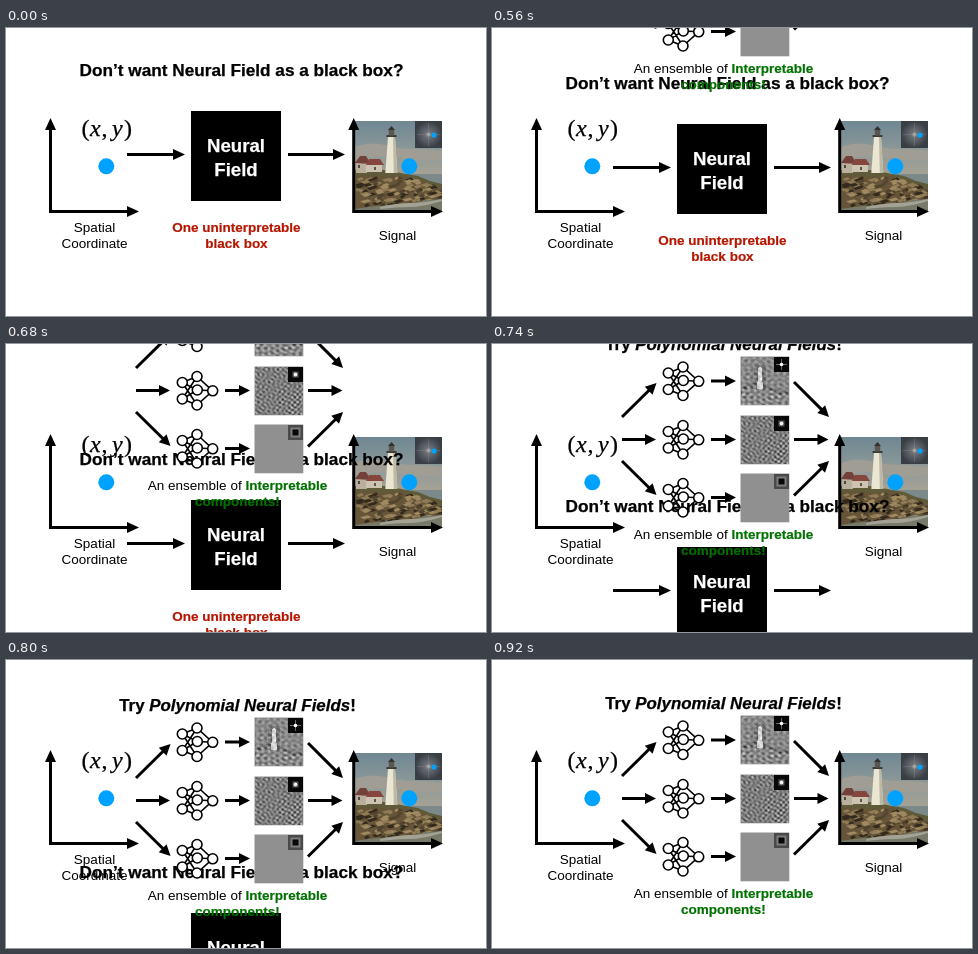
An HTML page that plays this animation: 480 px wide and 288 px high, repeating every 8 s.

```html
<!DOCTYPE html>
<html lang="en">
<head>
<meta charset="utf-8">
<title>Neural fields</title>
<style>
  html, body { margin: 0; width: 100%; height: 100%; overflow: hidden; background: #fff; }
  svg { display: block; width: 100%; height: 100%; }
  text { font-family: "Liberation Sans", Arial, sans-serif; font-size: 13.5px; text-anchor: middle; white-space: pre; }
  .b { font-weight: 700; }
  .title { font-weight: 700; font-size: 17.2px; stroke: #000; stroke-width: .25; }
  .sub { font-size: 16.9px; }
  .box { font-weight: 700; font-size: 18.6px; fill: #fff; stroke: #fff; stroke-width: .25; }
  .math { font-family: "Liberation Serif", "Times New Roman", serif; font-size: 24px; text-anchor: start; stroke: #000; stroke-width: .25; }
  .math .i { font-style: italic; }
  .red { fill: #b51700; stroke: #b51700; stroke-width: .2; }
  .green { fill: #017100; font-weight: 700; stroke: #017100; stroke-width: .2; }
</style>
</head>
<body>
<svg id="stage" viewBox="0 0 480 288">
  <defs>
    <linearGradient id="sky" x1="0" y1="0" x2="0" y2="1">
      <stop offset="0" stop-color="#6f8793"/>
      <stop offset=".35" stop-color="#8e9a99"/>
      <stop offset=".62" stop-color="#a8a294"/>
    </linearGradient>
    <radialGradient id="glow">
      <stop offset="0" stop-color="#c9bfb0"/>
      <stop offset=".2" stop-color="#6d7178"/>
      <stop offset="1" stop-color="#393d44"/>
    </radialGradient>
    <clipPath id="frame"><rect x="349" y="93" width="87" height="90"/></clipPath>
  </defs>
  <rect width="480" height="288" fill="#fff"/>
  <g id="fixed"></g>
  <g id="before"></g>
  <g id="after"></g>
</svg>
<script>
const LOOP = 8000, START = 500, STEP = 30, STEPS = 14;
const BLUE = '#00a2ff';
const $ = id => document.getElementById(id);

const text = (x, y, body, cls = '') => `<text x="${x}" y="${y}" class="${cls}">${body}</text>`;
const rect = (x, y, w, h, fill) => `<rect x="${x}" y="${y}" width="${w}" height="${h}" fill="${fill}"/>`;
const disc = (x, y, r, fill) => `<circle cx="${x}" cy="${y}" r="${r}" fill="${fill}"/>`;
const shape = (d, fill) => `<path d="${d}" fill="${fill}"/>`;

function random(seed) {
  return () => (seed = (seed * 16807) % 2147483647) / 2147483647;
}

function arrow(x1, y1, x2, y2, head = 11) {
  const len = Math.hypot(x2 - x1, y2 - y1);
  const angle = Math.atan2(y2 - y1, x2 - x1) * 180 / Math.PI;
  return `<g transform="translate(${x1} ${y1}) rotate(${angle})">` +
    `<path d="M0 0H${len - head + 1}" stroke="#000" stroke-width="3"/>` +
    `<path d="M${len} 0l${-head} -5.5v11z"/></g>`;
}

const axes = (x, tip) =>
  arrow(x, 185, x, 90, 12) + arrow(x, 183.5, tip, 183.5, 12);

// Short slanted facets scattered over the rocks.
function facets() {
  const rnd = random(17), tones = ['#33291c', '#8f7b55', '#51442f', '#a08a62'];
  let out = '';
  for (let i = 0; i < 130; i++) {
    const x = 349 + 82 * rnd(), top = 150 + Math.max(0, x - 395) * .28;
    const y = top + (178 - top) * rnd(), w = 3 + 5 * rnd();
    out += shape(`M${x} ${y}l${w} -2l${w / 2} 2l${-w} 2z`, tones[i % 4]);
  }
  return out;
}

function photo() {
  return '<g clip-path="url(#frame)">' +
    rect(349, 93, 87, 90, 'url(#sky)') +
    shape('M349 119q16 -6 30 -2t30 4t27 2v8q-22 3 -42 -1t-45 1z', '#a09e94') +
    rect(349, 146, 87, 37, '#7c898b') +
    shape('M349 142l14 -2l22 3l15 3l12 2l12 5l12 3v5l-22 5l-28 2l-37 1z', '#5f5a38') +
    rect(350, 134, 11, 11, '#b9af9c') + rect(360, 136, 16, 8, '#cdc3b0') +
    shape('M349 135l5 -7h6l5 8z', '#74403a') + shape('M360 137l3 -6h11l4 6z', '#84463d') +
    rect(352, 137, 2, 3, '#4c4740') + rect(368, 139, 2, 3, '#5a544b') +
    shape('M382 109h7l2.3 36h-12z', '#ebe6d2') + shape('M387 109h2l2.3 36h-3.5z', '#bdb8a6') +
    rect(380.5, 107, 10, 2, '#3c3a38') + rect(382.8, 101.5, 5.4, 6, '#5a5650') +
    shape('M382 102l3.5 -4l3.5 4z', '#33302e') +
    shape('M349 149l12 -2l18 2l20 -1l18 5l9 5l10 4v14l-20 2l-30 4l-37 2z', '#665538') +
    facets() +
    shape('M349 181q24 -4 40 -4t30 -5l17 -1v12h-87z', '#777969') +
    shape('M374 179q16 -4 30 -4t32 -4v2q-20 6 -33 6t-29 2z', '#a3a294') +
    '</g>' +
    rect(409, 93, 27, 27, 'url(#glow)') +
    '<path d="M422.5 95v23M411 106.5h23" stroke="#a99f92" stroke-width=".6" opacity=".45"/>' +
    disc(428, 107, 2.6, BLUE);
}

// Sum of plane waves that share one wavelength: a worm-like ripple around 0.
function ripple(seed, wavelength, squash) {
  const rnd = random(seed);
  const waves = Array.from({ length: 14 }, () => {
    const a = rnd() * Math.PI * 2, f = 2 * Math.PI / (wavelength * (.85 + .3 * rnd()));
    return [f * squash * Math.cos(a), f * Math.sin(a), rnd() * 6.28];
  });
  return (x, y) => waves.reduce((s, [u, v, p]) => s + Math.cos(u * x + v * y + p), 0) / 5;
}

// One path per grey level keeps the texture light.
function texture(x0, y0, size, shade) {
  const paths = {};
  for (let y = 0; y < size; y++) for (let x = 0; x < size; x++) {
    const g = Math.max(0, Math.min(240, Math.round(shade(x, y) / 16) * 16));
    paths[g] = (paths[g] || '') + `M${x0 + x} ${y0 + y}h1v1h-1z`;
  }
  return '<g shape-rendering="crispEdges">' + Object.entries(paths)
    .map(([g, d]) => shape(d, `rgb(${g},${g},${g})`)).join('') + '</g>';
}

const coarse = ripple(71, 4.2, .7), fine = ripple(29, 3.5, .75);

function scene(x, y) {
  const ground = 31 - 4 * Math.sin(x / 9);
  const off = Math.abs(x - 18.5);
  if (off < 1.4 + (y - 9) * .07 && y > 9 && y < 32) return 212 + 22 * coarse(x, y);
  const halo = off < 6 && y > 7 && y < 32 ? 20 : 0;
  const shore = Math.abs(y - ground) < 1.5 ? 25 : 0;
  return 136 - halo - shore + (y > ground ? 42 : 24) * coarse(x, y);
}

function net(cy) {
  const ins = [[176.3, cy - 8], [176.3, cy + 8.5]];
  const mid = [[191, cy - 14], [191.3, cy - .5], [191, cy + 14.5]];
  const out = [[206.7, cy + .3]];
  const link = (from, to) => from.map(a => to.map(b => `M${a}L${b}`).join('')).join('');
  return '<g stroke="#000" stroke-width="1.6" fill="#fff">' +
    `<path d="${link(ins, mid) + link(mid, out)}"/>` +
    [...ins, ...mid, ...out].map(([x, y]) => disc(x, y, 5, '#fff')).join('') + '</g>';
}

const badges = [
  (x, y) => `<path d="M${x + 7.5} ${y + 2}v11M${x + 2} ${y + 7.5}h11" stroke="#666"/>` +
    disc(x + 7.5, y + 7.5, 1.8, '#fff'),
  (x, y) => rect(x + 4.5, y + 4.5, 6, 6, '#555') + disc(x + 7.5, y + 7.5, 1.9, '#eee'),
  (x, y) => rect(x, y, 15, 15, '#4a4a4a') + rect(x + 2.5, y + 2.5, 10, 10, '#7c7c7c') +
    rect(x + 4.5, y + 4.5, 6, 6, '#080808')
];

function row(cy, i) {
  const top = [56, 115, 173][i];
  const shade = [scene, (x, y) => 124 + 44 * fine(x, y), () => 144][i];
  return net(cy) + arrow(219, cy, 244, cy) +
    rect(248.5, top - .5, 48.8, 48.8, '#909090') + texture(249, top, 48, shade) +
    rect(282, top, 15, 15, '#080808') + badges[i](282, top);
}

$('fixed').innerHTML =
  photo() + axes(44.5, 133) + axes(347.7, 437) +
  '<text y="107.7" class="math"><tspan x="75.5">(</tspan><tspan x="84" class="i">x</tspan>' +
  '<tspan x="95.5">,</tspan><tspan x="106" class="i">y</tspan><tspan x="118">)</tspan></text>' +
  disc(100.3, 138.3, 8, BLUE) + disc(403.3, 138.3, 8, BLUE) +
  text(88.5, 204, 'Spatial') + text(88.5, 219.5, 'Coordinate') + text(391.5, 212, 'Signal');

$('before').innerHTML =
  text(235.5, 48, 'Don’t want Neural Field as a black box?', 'title') +
  arrow(121, 126.5, 179, 126.5, 12) + arrow(282, 126.5, 339, 126.5, 12) +
  rect(185, 83, 90, 90, '#000') +
  text(230, 124, 'Neural', 'box') + text(230, 148, 'Field', 'box') +
  text(230.5, 204, 'One uninterpretable', 'b red') + text(230.5, 220, 'black box', 'b red');

$('after').innerHTML =
  text(231.5, 49, 'Try <tspan font-style="italic">Polynomial Neural Fields</tspan>!', 'title sub') +
  [80, 138.5, 196.5].map(row).join('') +
  arrow(130, 116, 164.5, 82) + arrow(130, 138.5, 164, 138.5) + arrow(130, 160, 164.5, 194) +
  arrow(302, 81, 337, 116) + arrow(302, 138.5, 336.5, 138.5) + arrow(302, 194.5, 337, 160) +
  text(231.5, 238, 'An ensemble of <tspan class="green">Interpretable</tspan>') +
  text(231.5, 254, 'components!', 'green');

// Falls away: speeds up, then keeps its pace.
const fall = n => n < 9 ? 1.485 * n * n : 120.3 + 25 * (n - 9);

// Slides in, runs a little too far and settles.
function arrive(k) {
  if (k <= 10) return -245 + 26 * k - .0126 * k ** 3;
  const u = (k - 10) / (STEPS - 10);
  return 2 * (1 - u) + 10 * Math.sin(Math.PI * u);
}

function place(id, dy, shown) {
  $(id).setAttribute('transform', `translate(0 ${Math.round(dy)})`);
  $(id).setAttribute('visibility', shown ? 'visible' : 'hidden');
}

function draw(now) {
  const k = Math.min(STEPS, Math.floor((now % LOOP - START) / STEP));
  place('before', k < 0 ? 0 : fall(k + 1), k < STEPS);
  place('after', k < 0 ? -288 : arrive(k), k >= 0);
}

const origin = performance.now();
function tick() {
  draw(performance.now() - origin);
  requestAnimationFrame(tick);
}
tick();
</script>
</body>
</html>
```
